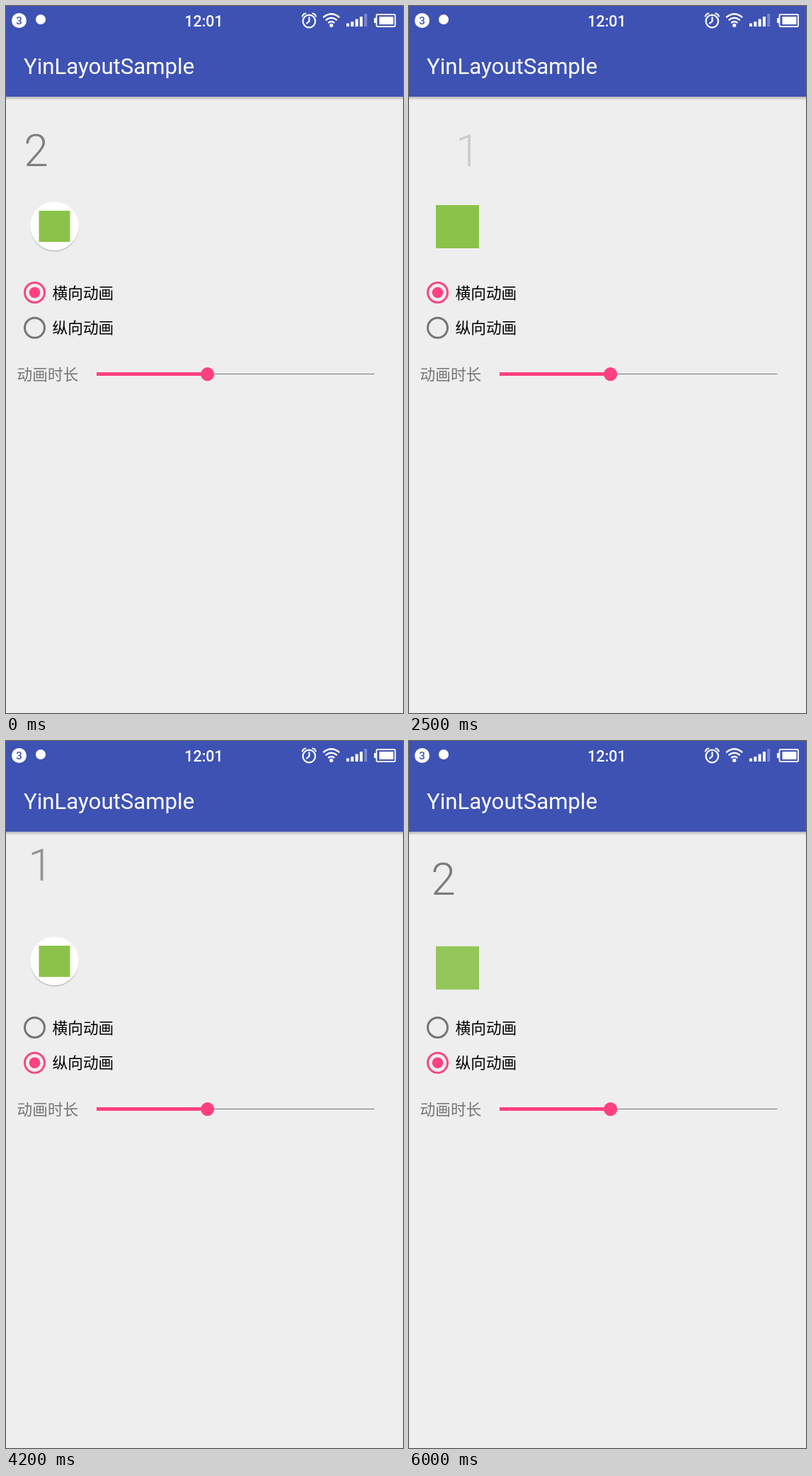
An HTML page for the animation above (6100 ms loop, 561 by 998 pixels).

```html
<!DOCTYPE html>
<html lang="zh">
<head>
<meta charset="utf-8">
<title>YinLayoutSample</title>
<style>
  html, body { margin: 0; width: 100%; height: 100%; overflow: hidden; background: #eee; }
  svg { display: block; width: 561px; height: 998px; }
  text { font-family: Roboto, sans-serif; }
  .label { font: 21.7px "Noto Sans CJK SC", "Noto Sans CJK", sans-serif; }
  .radio circle { fill: none; stroke: #757575; stroke-width: 3; }
  .radio .dot { fill: #ff4081; stroke: none; }
  .radio.on .ring { stroke: #f5487f; }
  .radio:not(.on) .dot { display: none; }
</style>
</head>
<body>
<svg viewBox="0 0 561 998">
  <defs>
    <linearGradient id="shade" x2="0" y2="1">
      <stop stop-color="#a8a8ac"/>
      <stop offset="1" stop-color="#eee"/>
    </linearGradient>
  </defs>
  <rect width="561" height="998" fill="#eee"/>

  <text id="digit" x="48.5" y="225.5" font-size="62.4" font-weight="300" text-anchor="middle" fill="#6f6f6f">2</text>

  <g id="icon">
    <g id="disc">
      <circle cx="68.5" cy="312.5" r="34.3" fill="#c9c9c9"/>
      <circle cx="68.5" cy="310.5" r="34.3" fill="#fff"/>
      <rect x="46.5" y="289" width="44" height="44" fill="#8bc34a"/>
    </g>
    <rect id="square" x="38" y="281" width="61" height="61" fill="#8bc34a"/>
  </g>

  <g class="radio" id="across">
    <circle class="ring" cx="40.5" cy="404.5" r="14"/>
    <circle class="dot" cx="40.5" cy="404.5" r="7.8"/>
  </g>
  <g class="radio" id="down">
    <circle class="ring" cx="40.5" cy="454.3" r="14"/>
    <circle class="dot" cx="40.5" cy="454.3" r="7.8"/>
  </g>
  <text class="label" x="65.5" y="412.5">横向动画</text>
  <text class="label" x="65.5" y="462.3">纵向动画</text>
  <text class="label" x="15.5" y="528" fill="#757575">动画时长</text>

  <path d="M285 519.5H520.5" stroke="#757575" stroke-width="1.2"/>
  <path d="M128 519.5H285" stroke="#ff4081" stroke-width="5"/>
  <circle cx="284.7" cy="519.7" r="9.6" fill="#ff4081"/>

  <rect y="127" width="561" height="6" fill="url(#shade)"/>
  <rect width="561" height="128" fill="#3e52b4"/>
  <text x="25" y="96" font-size="31.2" fill="#fff">YinLayoutSample</text>

  <!-- status bar -->
  <g fill="#fff">
    <circle cx="18.5" cy="20.5" r="10.5"/>
    <text x="18.5" y="26" font-size="15" font-weight="500" text-anchor="middle" fill="#3e52b4">3</text>
    <circle cx="49" cy="19" r="7"/>
    <text x="279.5" y="28.5" font-size="21.5" font-weight="500" text-anchor="middle">12:01</text>
    <path d="M481 24.5h4v4.5h-4zM487.3 22h4v7h-4zM493.6 18.5h4v10.5h-4zM499.9 15h4v14h-4z"/>
    <path d="M506.2 11h4v18h-4z" opacity=".3"/>
    <path d="M520 17h3v7h-3zM527.5 15h20v11h-20z"/>
    <circle cx="459.7" cy="27.3" r="2.6"/>
  </g>
  <g fill="none" stroke="#fff" stroke-width="2.2" stroke-linecap="round">
    <circle cx="428.3" cy="21.5" r="8.8"/>
    <path d="M428.5 16v5.5l-3.5 3M418.8 14.5q1-3.5 4.5-4M437.8 14.5q-1-3.5-4.5-4"/>
    <path d="M449 15.5q10.7-8.5 21.4 0M452.5 19.5q7.2-5.5 14.4 0M456 23.3q3.7-2.7 7.4 0" stroke-width="2.5"/>
    <rect x="523.5" y="12" width="26.5" height="17" rx="1.5" stroke-width="1.8"/>
  </g>
</svg>
<script>
  const LOOP = 6100, STEP = 100, VERTICAL_FROM = 2900;
  const $ = id => document.getElementById(id);

  // Each swap: the old view leaves left or up, then the new one enters from right or below.
  const digitMoves = [
    { start: -105, end: 795, axis: 'x', by: 47, from: 2, to: 0 },
    { start: 1895, end: 2795, axis: 'x', by: 47, from: 0, to: 1 },
    { start: 4040, end: 4940, axis: 'y', by: 100, from: 1, to: 2 },
    { start: 5913, end: 6813, axis: 'y', by: 100, from: 2, to: 0 }
  ];
  const iconMoves = [
    { start: 1172, end: 2077, axis: 'x', by: 86, from: 'disc', to: 'square' },
    { start: 3180, end: 4060, axis: 'y', by: 86, from: 'square', to: 'disc' },
    { start: 5265, end: 6085, axis: 'y', by: 86, from: 'disc', to: 'square' }
  ];

  const ease = x => (1 - Math.cos(Math.PI * x)) / 2;

  function pose(moves, time) {
    const move = moves.filter(m => m.start <= time).pop();
    if (!move) return { value: moves[0].from, x: 0, y: 0, alpha: 1 };
    const phase = Math.min(1, (time - move.start) / (move.end - move.start)) * 2;
    const leaving = phase < 1;
    const away = leaving ? ease(phase) : 1 - ease(phase - 1);
    const shift = (leaving ? -away : away) * move.by;
    return {
      value: leaving ? move.from : move.to,
      x: move.axis === 'x' ? shift : 0,
      y: move.axis === 'y' ? shift : 0,
      alpha: 1 - away
    };
  }

  function place(el, { x, y, alpha }) {
    el.setAttribute('transform', `translate(${x} ${y})`);
    el.setAttribute('opacity', alpha);
  }

  function draw() {
    const time = Math.floor((performance.now() % LOOP) / STEP) * STEP;
    const digit = pose(digitMoves, time);
    const icon = pose(iconMoves, time);

    $('digit').textContent = digit.value;
    place($('digit'), digit);
    for (const id of ['disc', 'square'])
      $(id).style.display = id === icon.value ? '' : 'none';
    place($('icon'), icon);

    $('across').classList.toggle('on', time < VERTICAL_FROM);
    $('down').classList.toggle('on', time >= VERTICAL_FROM);
    requestAnimationFrame(draw);
  }
  draw();
</script>
</body>
</html>
```
